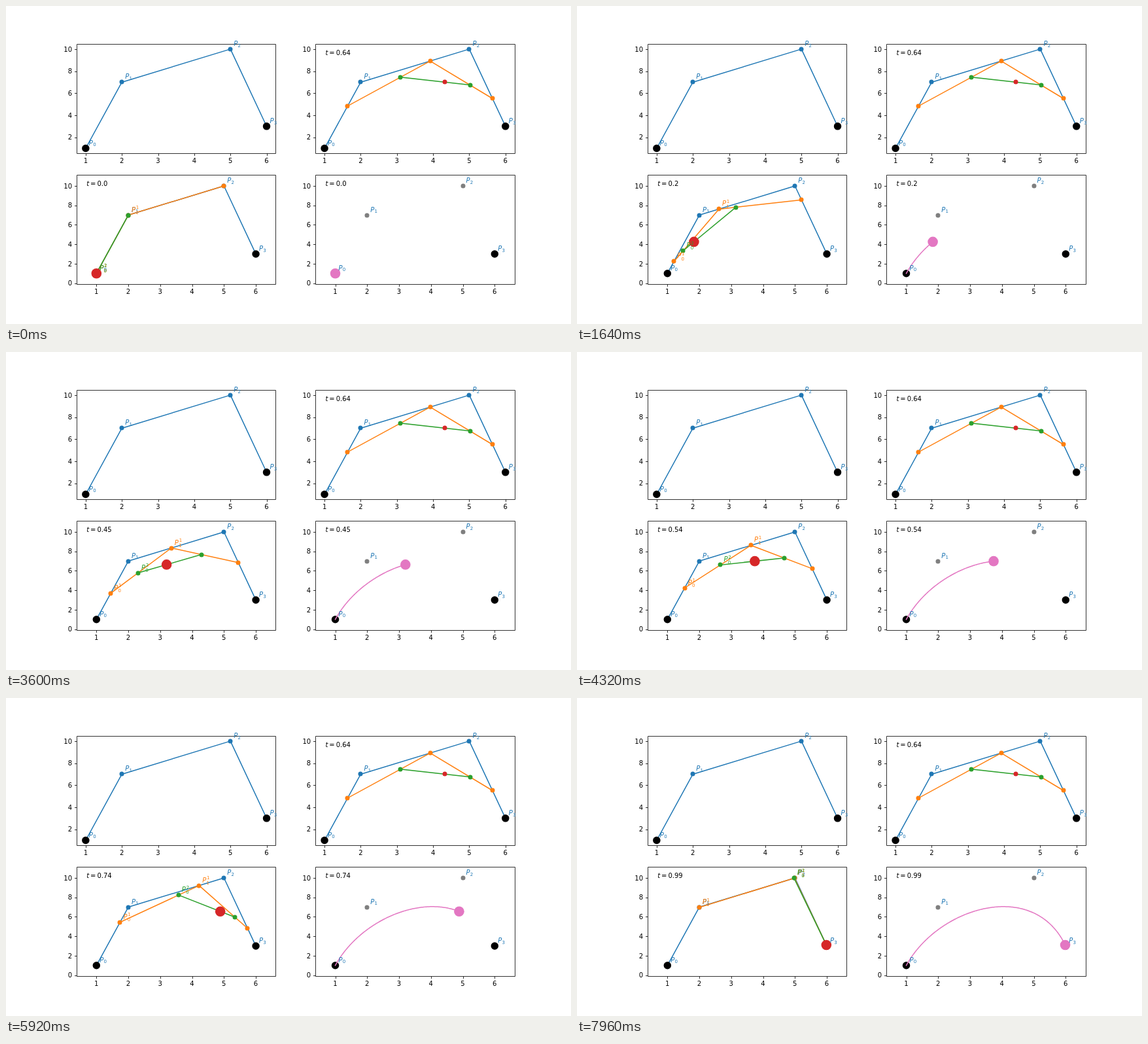
Recreate the animation shown at these times as an HTML page. Size 864x486 px, loop 8000 ms.

```html
<!DOCTYPE html>
<html lang="en">
<head>
<meta charset="utf-8">
<title>Bézier curve construction</title>
<style>
  html, body { margin: 0; width: 100%; height: 100%; overflow: hidden; background: #fff; }
  svg { display: block; width: 864px; height: 486px; }
  text { font: 10px "DejaVu Sans", sans-serif; white-space: pre; }
  .var { font-style: italic; }
  .script { font-size: 7px; }
</style>
</head>
<body>
<svg id="stage" viewBox="0 0 864 486"></svg>
<script>
const BLUE = '#1f77b4', ORANGE = '#ff7f0e', GREEN = '#2ca02c',
      RED = '#d62728', PINK = '#e377c2', GRAY = '#7f7f7f', BLACK = '#000';
const DOT = 3.5, END = 5.75, HEAD = 7.8;
const STEPS = 200, STEP_MS = 40;
const CONTROL = [[1, 1], [2, 7], [5, 10], [6, 3]];
const W = 304.364, H = 166.786;
const stage = document.getElementById('stage');

function add(parent, tag, attrs, text) {
  const el = document.createElementNS('http://www.w3.org/2000/svg', tag);
  for (const k in attrs) el.setAttribute(k, attrs[k]);
  if (text !== undefined) el.textContent = text;
  parent.appendChild(el);
  return el;
}

const place = (el, x, y) => el.setAttribute('transform', `translate(${x} ${y})`);
const crisp = v => Math.round(v) + 0.5;

// One set of axes, centred on the data point (3.5, 5.5).
function panel(left, top, ux, uy, firstY) {
  const p = {
    left, top,
    x: v => left + W / 2 + (v - 3.5) * ux,
    y: v => top + H / 2 - (v - 5.5) * uy,
    art: add(stage, 'g', {}),
    frame: add(stage, 'g', {}),
    notes: add(stage, 'g', {})
  };
  const l = crisp(left), t = crisp(top), r = crisp(left + W), b = crisp(top + H);
  let d = `M${l} ${t}H${r}V${b}H${l}Z`;
  for (let v = 1; v <= 6; v++) {
    d += `M${crisp(p.x(v))} ${b}v3.5`;
    add(p.frame, 'text', { x: p.x(v), y: Math.round(top + H + 14.6), 'text-anchor': 'middle' }, v);
  }
  for (let v = firstY; v <= 10; v += 2) {
    d += `M${l} ${crisp(p.y(v))}h-3.5`;
    add(p.frame, 'text', { x: left - 7, y: Math.round(p.y(v) + 3.7), 'text-anchor': 'end' }, v);
  }
  add(p.frame, 'path', { d, fill: 'none', stroke: BLACK, 'stroke-width': 0.8 });
  return p;
}

function disc(p, color, r, at) {
  const el = add(p.art, 'circle', { r, fill: color });
  const move = ([x, y]) => place(el, p.x(x), p.y(y));
  if (at) move(at);
  return move;
}

// Small markers sit on whole pixels.
function dot(p, color, at) {
  const el = add(p.art, 'circle', { r: DOT, fill: color });
  const move = ([x, y]) => place(el, Math.round(p.x(x)), Math.round(p.y(y)));
  if (at) move(at);
  return move;
}

function line(p, color, pts) {
  const el = add(p.art, 'polyline', {
    fill: 'none', stroke: color, 'stroke-width': 1.5,
    'stroke-linejoin': 'round', 'stroke-linecap': 'square'
  });
  const draw = q => el.setAttribute('points', q.map(([x, y]) => p.x(x) + ',' + p.y(y)).join(' '));
  if (pts) draw(pts);
  return draw;
}

function chain(p, color, count, pts) {
  const draw = line(p, color);
  const dots = Array.from({ length: count }, () => dot(p, color));
  const update = q => {
    draw(q);
    dots.forEach((move, i) => move(q[i]));
  };
  if (pts) update(pts);
  return update;
}

function label(p, color, sub, sup, at) {
  const g = add(p.notes, 'g', { fill: color });
  const both = sup !== '';
  add(g, 'text', { class: 'var' }, 'P');
  add(g, 'text', { class: 'script', x: 6.3, y: both ? 3.2 : 1.7 }, sub);
  if (both) add(g, 'text', { class: 'script', x: 6.8, y: -4.4 }, sup);
  const move = ([x, y]) => place(g, p.x(x) + 5, p.y(y) - 5);
  if (at) move(at);
  return move;
}

function clock(p, value) {
  const g = add(p.notes, 'g', {});
  place(g, p.left + 0.05 * W, Math.round(p.top + 0.1 * H));
  add(g, 'text', { class: 'var' }, 't');
  add(g, 'text', { x: 5.9 }, '=');
  const num = add(g, 'text', { x: 16.2 }, value);
  return s => { num.textContent = s; };
}

const names = p => CONTROL.forEach((pt, i) => label(p, BLUE, i, '', pt));
const ends = p => [0, 3].forEach(i => disc(p, BLACK, END, CONTROL[i]));

// One round of de Casteljau interpolation.
const blend = (pts, t) => pts.slice(1).map((b, i) =>
  b.map((v, k) => pts[i][k] + (v - pts[i][k]) * t));

function levels(t) {
  const a = blend(CONTROL, t), b = blend(a, t);
  return [a, b, blend(b, t)[0]];
}

function format(t) {
  // exact ties go to the even digit
  const s = String(+(t % 0.5 === 0.125 ? t - 1e-9 : t).toFixed(2));
  return s.includes('.') ? s : s + '.0';
}

const L = 108, R = 473.236, T = 58.32, B = 258.463;

const polygon = panel(L, T, W / 5.5, H / 9.9, 2);
chain(polygon, BLUE, 4, CONTROL);
ends(polygon);
names(polygon);

const sample = panel(R, T, W / 5.5, H / 9.9, 2);
const [s1, s2, s3] = levels(0.64);
chain(sample, BLUE, 4, CONTROL);
ends(sample);
chain(sample, ORANGE, 3, s1);
chain(sample, GREEN, 2, s2);
dot(sample, RED, s3);
names(sample);
clock(sample, '0.64');

const build = panel(L, B, 48.75, 14.86, 0);
chain(build, BLUE, 4, CONTROL);
ends(build);
const first = chain(build, ORANGE, 3);
const second = chain(build, GREEN, 2);
const point = disc(build, RED, HEAD);
names(build);
const tag01 = label(build, ORANGE, '0', '1');
const tag11 = label(build, ORANGE, '1', '1');
const tag02 = label(build, GREEN, '0', '2');
const buildClock = clock(build, '0.0');

const trace = panel(R, B, 48.75, 14.86, 0);
[1, 2].forEach(i => dot(trace, GRAY, CONTROL[i]));
ends(trace);
const curve = line(trace, PINK);
const pen = disc(trace, PINK, HEAD);
names(trace);
const traceClock = clock(trace, '0.0');

function show(step) {
  const t = step / STEPS;
  const [a, b, c] = levels(t);
  first(a);
  second(b);
  point(c);
  tag01(a[0]);
  tag11(a[1]);
  tag02(b[0]);
  curve(Array.from({ length: step + 1 }, (_, i) => levels(i / STEPS)[2]));
  pen(c);
  buildClock(format(t));
  traceClock(format(t));
}

let start = null, shown = 0;
function tick(now) {
  if (start === null) start = now;
  const step = Math.floor(Math.max(0, now - start) / STEP_MS) % STEPS;
  if (step !== shown) show(shown = step);
  requestAnimationFrame(tick);
}
show(0);
requestAnimationFrame(tick);
</script>
</body>
</html>
```
